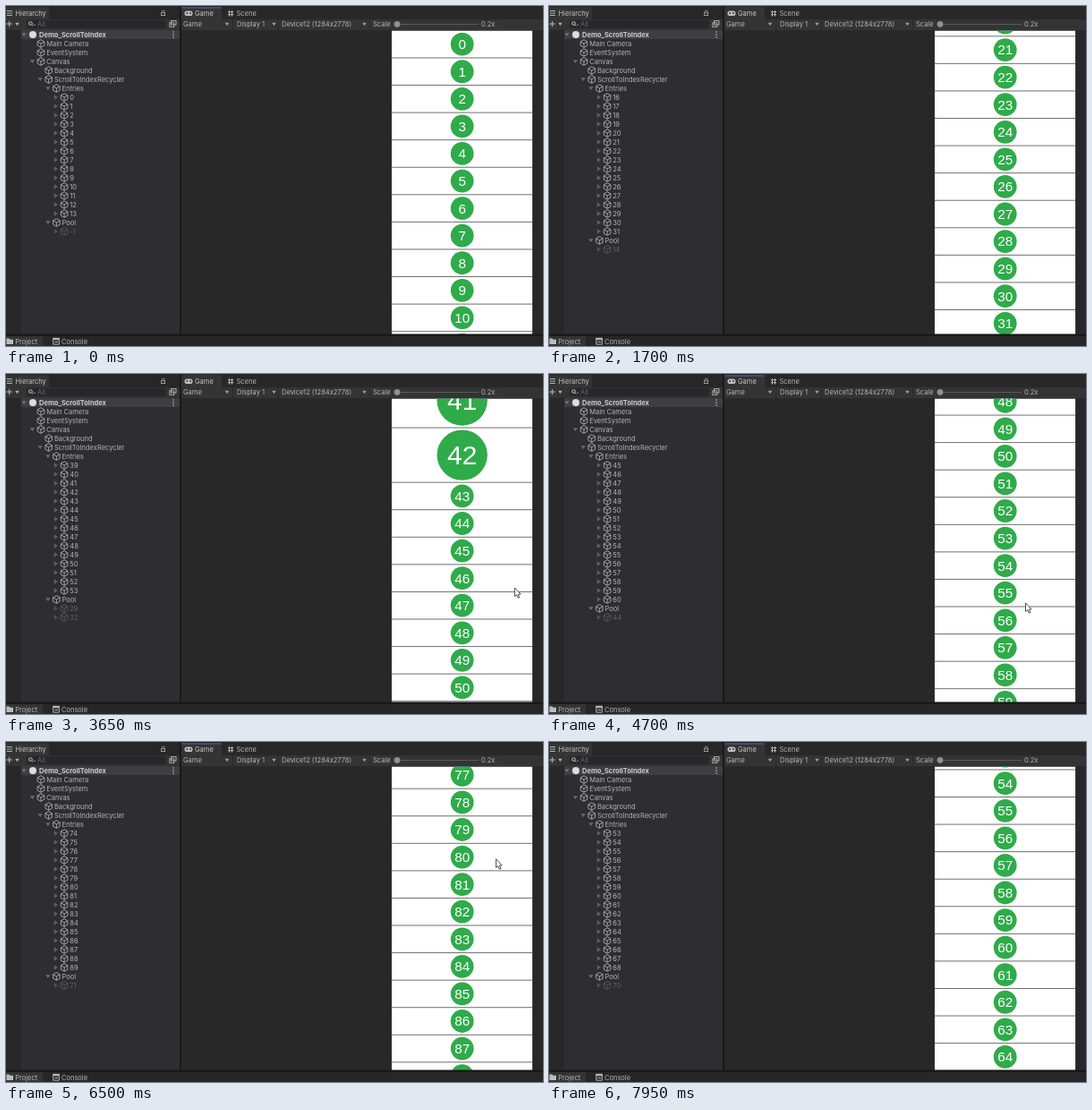
These frames come from a looping animation (600 by 380 pixels, 8000 ms). An HTML page with a canvas:

```html
<!DOCTYPE html>
<html lang="en">
<head>
<meta charset="utf-8">
<title>Scroll to index</title>
<style>
  html, body { margin: 0; width: 100%; height: 100%; overflow: hidden; background: #282829; }
  canvas { display: block; width: 600px; height: 380px; }
</style>
</head>
<body>
<canvas id="stage" width="600" height="380"></canvas>
<script>
const ctx = document.getElementById('stage').getContext('2d');
const LOOP = 8000;
const ROW = 30.57;                       // height of a regular list entry
const VIEW = { x: 430.8, y: 27.4, w: 157.5, h: 340 };
const REPAINT = 170, REPAINT_PHASE = 65; // the hierarchy refreshes less often than the list
const POOL_SIZE = 17;
const UI = 'Inter, sans-serif';
const TEXT = '#b4b4b4', DIM = '#626262', PANEL = '#2e2e30', BAR = '#343435', DARK = '#272728';

// [time, values...]: a steady scroll to an index, flings down and back up, then a steady scroll again
const SCROLL = [[638, 0], [2782, 1281.9], [4269, 1281.9], [5800, 2198.2],
                [6100, 2346], [6550, 2430], [7150, 2058.9], [7400, 1929], [7750, 1829], [8000, 1679]];
const POINTER = [[3500, 603, 228], [3650, 568.5, 239], [3900, 545, 250], [4250, 533, 256],
                 [4700, 532.5, 256], [5800, 525.5, 113],
                 [6400, 540, 125], [6800, 570, 148], [7150, 590.5, 168], [7300, 603, 176]];

const clamp = (v, lo, hi) => Math.min(hi, Math.max(lo, v));

function sample(keys, t) {
  if (t <= keys[0][0]) return keys[0].slice(1);
  const i = keys.findIndex(k => k[0] >= t);
  if (i < 0) return keys[keys.length - 1].slice(1);
  const a = keys[i - 1], b = keys[i], u = (t - a[0]) / (b[0] - a[0]);
  return a.slice(1).map((v, n) => v + (b[n + 1] - v) * u);
}

const scrollAt = t => sample(SCROLL, t)[0];

// Entries 41 and 42 are twice as tall as the others.
const rowTop = i => ROW * (i + clamp(i - 41, 0, 2));
const isBig = i => i === 41 || i === 42;

function visibleRange(scroll) {
  let first = 0;
  while (rowTop(first + 1) <= scroll) first++;
  let last = first;
  while (rowTop(last + 1) < scroll + VIEW.h) last++;
  return [first, last];
}

function rect(x, y, w, h, color) {
  ctx.fillStyle = color;
  ctx.fillRect(x, y, w, h);
}

function text(str, x, y, color, font, align = 'left') {
  ctx.font = font;
  ctx.fillStyle = color;
  ctx.textAlign = align;
  ctx.textBaseline = 'alphabetic';
  ctx.fillText(str, x, y);
}

const label = (str, x, y, color = TEXT, weight = '') => text(str, x, y + 2.7, color, `${weight} 7.5px ${UI}`);

function path(points, close = false) {
  ctx.beginPath();
  points.forEach(([x, y]) => ctx.lineTo(x, y));
  if (close) ctx.closePath();
}

function stroke(points, color = TEXT, width = 0.9, close = false) {
  path(points, close);
  ctx.strokeStyle = color;
  ctx.lineWidth = width;
  ctx.stroke();
}

function fill(points, color) {
  path(points, true);
  ctx.fillStyle = color;
  ctx.fill();
}

function disc(x, y, r, color) {
  ctx.beginPath();
  ctx.arc(x, y, r, 0, 7);
  ctx.fillStyle = color;
  ctx.fill();
}

const arrowDown = (x, y, color = '#7c7c7c', r = 2.6) =>
  fill([[x - r, y - r * 0.7], [x + r, y - r * 0.7], [x, y + r * 0.8]], color);
const arrowRight = (x, y, color) => fill([[x - 1.8, y - 2.7], [x + 2.4, y], [x - 1.8, y + 2.7]], color);

function cube(x, y, color = '#acacac') {
  stroke([[x, y - 4.3], [x + 3.8, y - 2.2], [x + 3.8, y + 2.2], [x, y + 4.3],
          [x - 3.8, y + 2.2], [x - 3.8, y - 2.2]], color, 0.9, true);
  stroke([[x - 3.8, y - 2.2], [x, y], [x + 3.8, y - 2.2]], color);
  stroke([[x, y], [x, y + 4.3]], color);
}

function kebab(x, y) {
  for (const d of [-3, 0, 3]) rect(x - 0.7, y + d - 0.7, 1.4, 1.4, TEXT);
}

function node(name, depth, y, { fold, color = TEXT } = {}) {
  const x = 39 + depth * 8.7;
  if (fold === 'open') arrowDown(x - 9.5, y, '#6c6c6c');
  if (fold === 'closed') arrowRight(x - 9.5, y, color === DIM ? '#505050' : '#606060');
  cube(x, y, color === DIM ? '#5a5a5a' : undefined);
  label(name, x + 6.2, y, color);
}

function poolLabels(first, last, goingDown) {
  if (first === 0) return [-1];
  const free = POOL_SIZE - (last - first + 1);
  if (free <= 0) return [];
  if (free > 1) return [first - 10, first - 7].map(n => Math.max(-1, n));
  return [goingDown ? Math.max(-1, first - 1 - first % 3) : last + 1 + (last >> 2) % 2];
}

function drawHierarchy(t) {
  rect(0, 0, 194, 367, PANEL);
  rect(0, 0, 194, 15, DARK);
  rect(0, 1, 48, 14, BAR);
  rect(0, 15, 194, 12, BAR);
  rect(0, 27, 17, 340, '#28282a');
  rect(17, 27, 177, 10, '#3e3e40');

  for (const y of [5.5, 8, 10.5]) rect(1, y - 0.5, 6, 1, TEXT);
  label('Hierarchy', 10.5, 8.5, '#c4c4c4');
  ctx.strokeStyle = TEXT;
  ctx.lineWidth = 0.8;
  ctx.beginPath();
  ctx.arc(175.8, 6.7, 1.6, Math.PI, 0);
  ctx.stroke();
  ctx.strokeRect(173.6, 7.6, 4, 3);

  stroke([[0.5, 20], [7, 20]], TEXT, 1.1);
  stroke([[3.7, 16.8], [3.7, 23.2]], TEXT, 1.1);
  arrowDown(12.5, 20.3, TEXT, 2.2);
  ctx.beginPath();
  ctx.roundRect(23, 15.8, 156, 9.2, 3);
  ctx.fillStyle = '#28282a';
  ctx.fill();
  ctx.beginPath();
  ctx.arc(27.5, 19.5, 1.8, 0, 7);
  ctx.stroke();
  stroke([[28.8, 20.8], [30.5, 22.5]]);
  arrowDown(32, 21.3, TEXT, 1);
  label('All', 35, 20.3, '#686868');
  ctx.strokeStyle = TEXT;
  ctx.strokeRect(184.5, 16.5, 5.5, 4.5);
  ctx.strokeRect(182.8, 18.8, 5, 4.5);

  arrowDown(20, 32, '#707070');
  disc(30, 32, 4, '#dcdcdc');
  label('Demo_ScrollToIndex', 37, 32, '#cacaca', 'bold');
  kebab(187, 32);
  node('Main Camera', 0, 42);
  node('EventSystem', 0, 52);
  node('Canvas', 0, 62, { fold: 'open' });
  node('Background', 1, 72);
  node('ScrollToIndexRecycler', 1, 82, { fold: 'open' });
  node('Entries', 2, 92, { fold: 'open' });

  const painted = REPAINT_PHASE + Math.floor((t - REPAINT_PHASE) / REPAINT) * REPAINT;
  const scroll = scrollAt(painted);
  const [top, bottom] = visibleRange(scroll);
  const first = Math.max(0, top - 2), last = bottom + 2;
  let y = 102;
  for (let i = first; i <= last; i++, y += 10) node(String(i), 3, y, { fold: 'closed' });
  node('Pool', 2, y, { fold: 'open' });
  for (const n of poolLabels(first, last, scroll >= scrollAt(painted - 10))) {
    y += 10;
    node(String(n), 3, y, { fold: 'closed', color: DIM });
  }
}

function drawGameChrome(t) {
  rect(194, 0, 2, 367, '#191919');
  rect(196, 0, 404, 367, '#282829');
  rect(196, 1, 45, 14, BAR);
  rect(196, 15, 404, 12, BAR);
  const focused = t < 950 || t > 3800;
  if (focused) rect(196, 1.5, 45, 1, '#3a6ea5');

  ctx.beginPath();
  ctx.roundRect(199.5, 5.5, 9, 5.5, 2.5);
  ctx.fillStyle = '#c0c0c0';
  ctx.fill();
  disc(202.3, 8, 1, BAR);
  disc(206, 8, 1, BAR);
  label('Game', 211, 8.5, '#c4c4c4');
  for (const d of [-1.5, 1.5]) {
    stroke([[251 + d, 5], [251 + d, 11.5]], TEXT, 1);
    stroke([[247.8, 8.2 + d], [254.2, 8.2 + d]], TEXT, 1);
  }
  label('Scene', 257.5, 8.5);

  label('Game', 198, 20.3);
  label('Display 1', 258, 20.3);
  label('Device12 (1284x2778)', 308, 20.3);
  label('Scale', 410, 20.3);
  label('0.2x', 531, 20.3);
  for (const x of [247, 299.5, 400.5]) arrowDown(x, 20.3, '#a0a0a0', 2.2);
  for (const x of [253, 304, 406]) rect(x, 15, 1, 12, '#29292a');
  rect(437, 20, 91, 1, '#585858');
  disc(437, 20.3, 3.4, '#919191');
}

function drawList(scroll) {
  const { x, y, w, h } = VIEW;
  ctx.save();
  ctx.beginPath();
  ctx.rect(x, y, w, h);
  ctx.clip();
  rect(x, y, w, h, '#fff');
  const [first, last] = visibleRange(scroll);
  for (let i = first; i <= last; i++) {
    const top = y + rowTop(i) - scroll;
    const bottom = y + rowTop(i + 1) - scroll;
    const mid = (top + bottom) / 2;
    const big = isBig(i);
    rect(x, bottom - 0.5, w, 1, '#707070');
    disc(509.7, mid, big ? 28.2 : 12.9, '#2fab4a');
    text(String(i), 509.7, mid + (big ? 10.5 : 5.4), '#fff',
      `${big ? 30 : 15.3}px "Liberation Sans", Arial, sans-serif`, 'center');
  }
  ctx.restore();
}

function drawFooter() {
  rect(0, 366.5, 600, 2.5, '#191919');
  rect(0, 369, 600, 11, DARK);
  rect(0, 369, 41, 11, BAR);
  fill([[0.5, 371.5], [3.5, 371.5], [4.5, 372.7], [8, 372.7], [8, 378], [0.5, 378]], '#bcbcbc');
  label('Project', 10.3, 375);
  ctx.strokeStyle = TEXT;
  ctx.lineWidth = 1;
  ctx.strokeRect(52.8, 371.3, 6.5, 6.8);
  rect(52.5, 371, 7, 2.3, TEXT);
  rect(54.5, 375, 3.5, 1, TEXT);
  label('Console', 62, 375);
}

function drawPointer(t) {
  if (t < POINTER[0][0] || t > POINTER[POINTER.length - 1][0]) return;
  const [x, y] = sample(POINTER, t);
  const shape = [[0, 0], [0, 9.6], [2.2, 7.7], [3.8, 11.3], [5.4, 10.6], [3.8, 7.2], [6.6, 7]]
    .map(([dx, dy]) => [x + dx, y + dy]);
  fill(shape, '#fff');
  stroke(shape, '#222', 0.8, true);
}

function draw(t) {
  drawHierarchy(t);
  drawGameChrome(t);
  drawList(scrollAt(t));
  drawFooter();
  drawPointer(t);
}

const start = performance.now();
function tick() {
  draw((performance.now() - start) % LOOP);
  requestAnimationFrame(tick);
}
tick();
</script>
</body>
</html>
```
